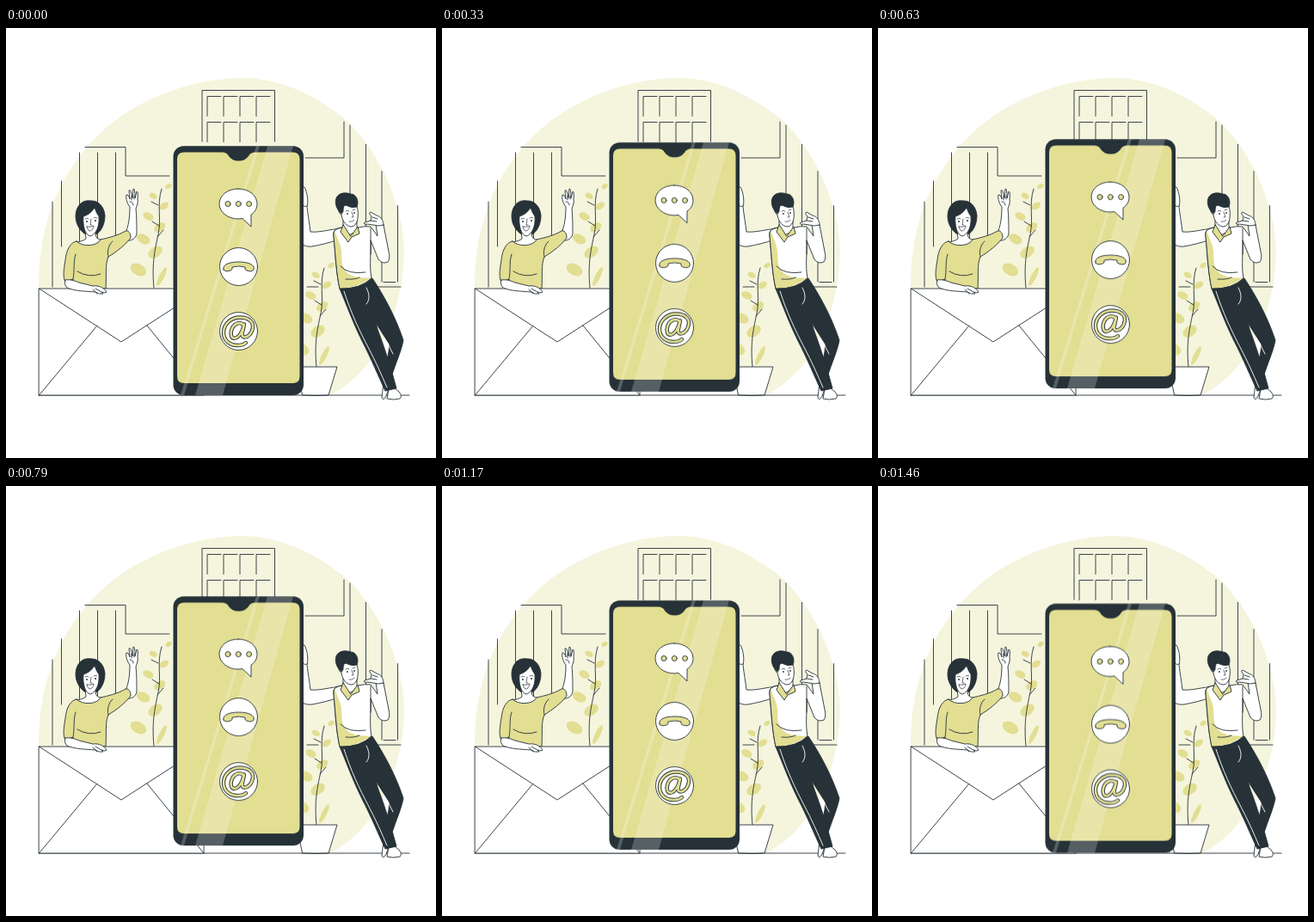
Write an HTML page that moves like this. It is 500x500 px and loops after 1500 ms.

```html
<!DOCTYPE html>
<html lang="en">
<head>
<meta charset="utf-8">
<title>Contact us</title>
<style>
  html, body { margin: 0; width: 100%; height: 100%; overflow: hidden; background: #fff; }
  svg { display: block; width: 100vw; height: 100vh; }
  .line { fill: none; }
  .ink { stroke: #263238; stroke-width: .9; stroke-linecap: round; stroke-linejoin: round; }
  .dark { fill: #263238; }
  .lime { fill: #e2de92; }
  .white { fill: #fff; }
  .flat { stroke: none; }
  .pale { fill: none; stroke: #fff; stroke-width: .9; stroke-linecap: round; }
</style>
</head>
<body>
<svg viewBox="0 0 500 500">
  <defs>
    <clipPath id="body"><rect x="194.500" y="137.300" width="151.500" height="289.700" rx="12"/></clipPath>
    <g id="plant">
      <g class="lime" id="leaves"></g>
      <path class="line ink" d="M172 302C169 272 174 255 177 240C181 222 175 205 181 187M176 243L183 235M178 230L170 225M177 206L169 202"/>
    </g>
    <path id="at" class="line" d="M276.500 346C273 341 266 343 263 349C260 356 262 362 267 360.500C272 359 275 352 277 344.500L274.500 356C274 362 283 360 286 352C290 342 282 336.500 272 336.500C261 336.500 253 345 253 354C253 364 261 369 269 369C274 369 277 368 279 366"/>
  </defs>

  <path fill="#f5f5de" d="M38 303C37 225 65 164 111 121C155 80 220 58 276 58C318 59 354 75 392 104C436 143 462 208 463 259C462 326 435 397 377 427H38Z"/>
  <path class="white" d="M230 400H343V427H230Z"/>

  <g class="line ink">
    <path d="M228 132V72.500H312.500V132M92 138.500H139V172H190M348 151H393V109"/>
    <path id="panes"/>
    <path id="walls"/>
    <path d="M54 202V301M64.500 178V254M350 301H363M430 301H459M439 295.500H453"/>
  </g>

  <use href="#plant"/>
  <use href="#plant" x="189" y="92"/>
  <path class="white ink" d="M338 394H385L375 427Q360 428 345 427Z"/>

  <!-- woman -->
  <g class="ink">
    <path class="white" d="M138 240C143 231 144 218 144 208C140 203 139 196 140 194Q142 193 144 199L143 189Q145 186 147 198L148 187Q150 186 150 198L152 190Q154 190 153 199C154 203 152 207 151 210C152 220 152 232 152 239C151 245 146 248 139 247Z"/>
    <path class="line" d="M146 200V195M149 199V195M144 202Q148 202 148 206"/>
    <path class="dark" d="M98 201C88 199 81 208 81 219C81 229 87 237 94 241H103C110 238 115 229 115 218C114 207 107 200 98 201Z"/>
    <path class="white" d="M92 235L93 245C88 249 83 248 79 250Q87 260 98 258Q108 256 111 246C106 246 104 244 104 236Z"/>
    <path class="white" d="M103 209C99 215 94 218 90 219C89 230 92 241 98 242C105 240 109 230 108 219Q105 215 103 209Z"/>
    <path class="lime" d="M82 248C75 249 70 258 69 270C67 281 66 291 69 295L78 292V303H116C117 288 115 275 119 266C129 260 139 252 145 244C145 238 142 235 139 236C129 242 118 244 110 246C106 254 89 255 82 248Z"/>
    <path class="line" d="M78 292C80 282 78 271 81 263M119 266C117 259 120 251 124 248M83 283Q96 291 110 286"/>
    <path class="line" stroke-width=".7" d="M92 222Q94 220 96 222M102 221Q104 219 106 221M99 222L98 229H100"/>
    <path class="white" stroke-width=".7" d="M94 231Q98 232 102 230Q101 236 97 236Q95 235 94 231Z"/>
    <circle class="dark flat" cx="94" cy="225" r="1"/><circle class="dark flat" cx="104" cy="224" r="1"/>
  </g>

  <path class="line ink" d="M38 427H469"/>
  <g class="ink">
    <path class="white" d="M38.500 303H230V427H38.500Z"/>
    <path class="line" d="M38.500 303L134 365L230 303M38.500 427L106 346M230 427L164 346"/>
    <path class="white" d="M69 293C75 292 80 294 85 296L101 300C108 299 114 302 117 307Q116 309 111 307L113 309Q108 310 104 307C92 306 80 306 71 302Q67 298 69 293Z"/>
    <path class="line" d="M104 303L111 307M101 304L106 309"/>
  </g>

  <!-- man -->
  <g class="ink">
    <path class="white" d="M390 233C377 234 365 238 354 237C353 228 351 217 350 208C352 201 350 190 347 185Q344 184 343 190V250Q347 255 356 254C366 252 376 250 386 246Z"/>
    <path class="line" d="M345 206Q348 209 350 207"/>
    <path class="white" d="M439 412L437 430Q439 434 442 428L447 414ZM445 420L443 431Q450 433 458 431Q461 428 457 423L452 419Z"/>
    <path class="dark" d="M410 301L426 291C440 312 453 336 462 363C460 375 453 390 448 406L440 402C442 391 445 379 446 368C436 352 424 336 410 301Z"/>
    <path class="dark" d="M388 303C396 322 404 344 414 364C424 383 433 405 441 422L454 419C448 396 441 374 432 350C428 334 426 314 422 294Q407 303 388 303Z"/>
    <path class="pale" d="M393 306C401 331 411 352 421 371C430 388 437 404 443 418M419 302C424 311 422 318 419 321M445 369L450 379"/>
    <path class="white" d="M391 232C384 233 380 235 381 242C383 263 384 286 388 303Q412 304 425 291C422 275 425 260 424 247L433 269Q438 275 444 272Q447 268 445 260L439 229L430 228L432 242L424 231Q416 230 410 232Z"/>
    <path class="lime flat" d="M382 235L386 246C394 262 387 272 394 281C400 291 414 290 424 291Q409 303 388 303C385 287 383 261 381 243Z"/>
    <path class="line" d="M391 232C384 233 380 235 381 242C383 263 384 286 388 303Q412 304 425 291M424 233V263M395 292Q405 293 411 290M389 277Q398 287 418 284"/>
    <path class="white" d="M392 221V235Q401 246 408 233V224Z"/>
    <path class="lime" d="M392 229L389 237L398 249L402 243L411 239L409 231L401 242Z"/>
    <path class="white" d="M388 208C386 212 387 216 390 217C391 225 396 231 402 231C409 230 411 218 408 207L402 204Z"/>
    <path class="dark" d="M390 216C384 211 382 203 384 198C387 191 395 191 401 193C407 193 411 201 408 208Q402 210 395 206Q392 206 392 213Z"/>
    <path class="line" stroke-width=".7" d="M395 213Q397 211 399 213M403 212L406 211M402 214L404 220H402M399 225Q403 226 405 223"/>
    <circle class="dark flat" cx="397" cy="216" r=".9"/><circle class="dark flat" cx="405" cy="215" r=".9"/>
    <path class="white" d="M439 229C439 224 436 219 431 218L424 214Q421 215 425 219L424 224L417 226Q415 229 420 228L427 229Q433 231 439 229Z"/>
    <path class="line" d="M426 220L432 222M424 224L431 225"/>
  </g>

  <g id="phone">
    <rect class="dark" x="194.500" y="137.300" width="151.500" height="289.700" rx="12"/>
    <path class="lime" d="M207 144.500H251Q257 144.500 259 149Q263 154.500 270.500 154.500Q278 154.500 282 149Q284 144.500 290 144.500H333.500Q341.500 144.500 341.500 152.500V405Q341.500 413 333.500 413H207Q199 413 199 405V152.500Q199 144.500 207 144.500Z"/>
    <path clip-path="url(#body)" fill="#fff" opacity=".22" d="M304 137H334L252 427H220ZM291 137H295L207 427H203Z"/>
    <g class="ink">
      <path class="white" d="M270 187C257 187 248 195 248 204.500C248 214 258 222 270 222L275 221.500L285 231V217C290 214 292 209 292 204.500C292 195 283 187 270 187Z"/>
      <g class="lime" id="dots"></g>
      <circle class="white" cx="270.500" cy="277.500" r="22"/>
      <path class="lime" d="M253 281C251 275 260 272 270.500 272C281 272 290 275 288 281Q286 284 280 282Q277 281 278 278Q271 276 263 278Q264 281 261 282Q255 284 253 281Z"/>
      <circle class="white" cx="270.500" cy="352.500" r="22"/>
    </g>
    <g fill="none" stroke-linecap="round" stroke-linejoin="round">
      <use href="#at" stroke="#263238" stroke-width="4.400"/>
      <use href="#at" stroke="#e2de92" stroke-width="2.600"/>
    </g>
  </g>
</svg>
<script>
  const byId = id => document.getElementById(id);
  const times = (n, f) => Array.from({ length: n }, (_, i) => f(i)).join("");

  // Leaves alternate along the stem and shrink towards the tip.
  byId("leaves").innerHTML = times(8, i => {
    const t = i / 7, left = i % 2 === 0;
    const x = 171 + 10 * t + (left ? 10 * t - 17 : 8 * t);
    const y = 281 - 97 * t ** 0.8;
    const r = 10 - 6 * t;
    return `<ellipse rx="${r}" ry="${r * 0.65}" transform="translate(${x} ${y}) rotate(${left ? 28 : -35})"/>`;
  }) + `<ellipse rx="3" ry="12" transform="translate(181 289) rotate(26)"/>`;

  byId("panes").setAttribute("d", times(8, i =>
    `M${234 + 19 * (i % 4)} ${i < 4 ? 102.5 : 132.5}v-23h16`));

  byId("walls").setAttribute("d",
    times(3, i => `M${85.5 + 21 * i} 145V254`) +
    times(4, i => `M${400 + 18.5 * i} ${113 + 18 * i + 4.4 * i * i}V295`));

  byId("dots").innerHTML = times(3, i => `<circle cx="${258 + 12.3 * i}" cy="204.5" r="3"/>`);

  byId("phone").animate(
    [0, -9.4, 0].map(y => ({ transform: `translateY(${y}px)` })),
    { duration: 1500, iterations: Infinity, easing: "linear" }
  );
</script>
</body>
</html>
```
